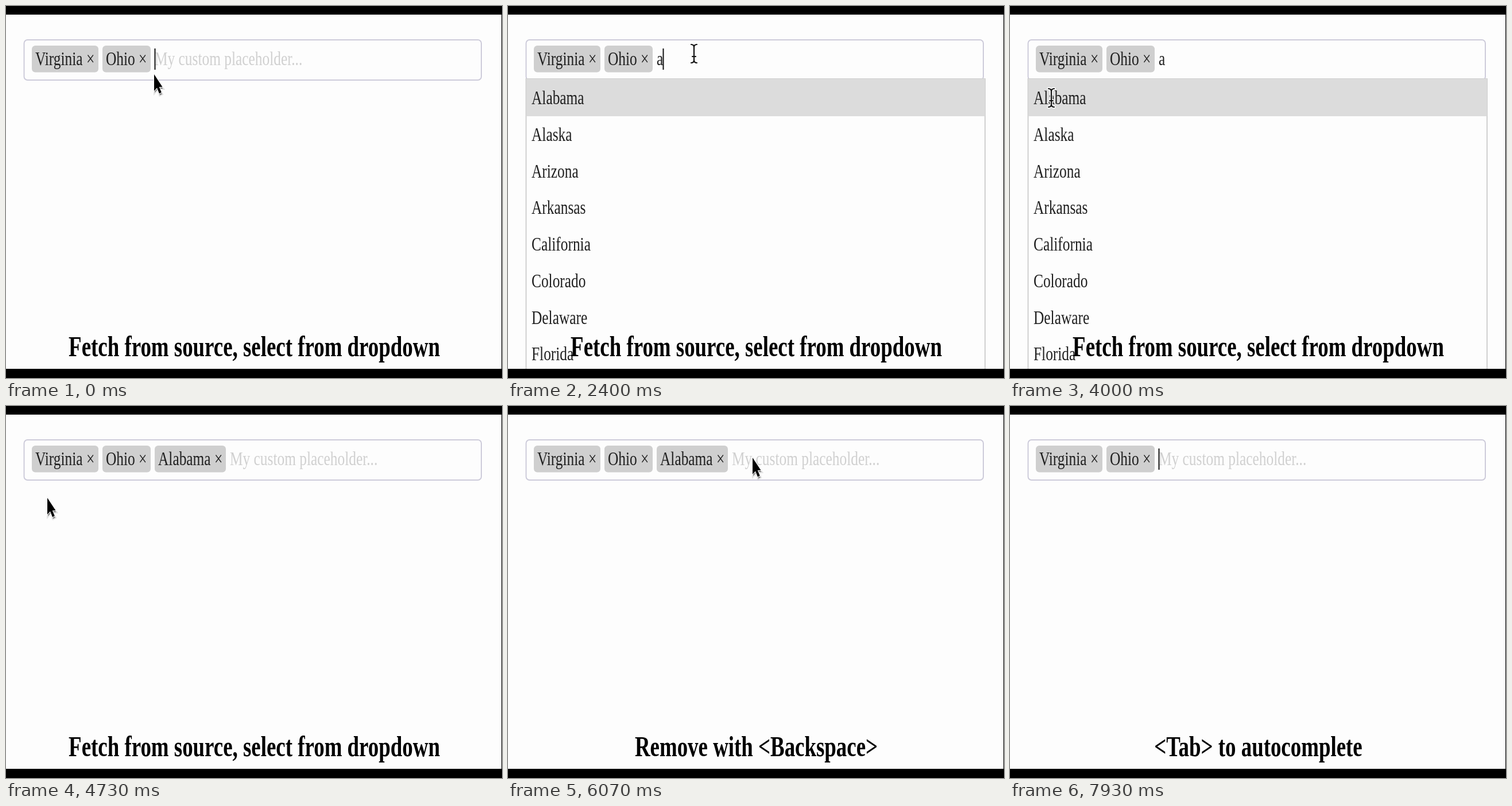
Write an HTML page that moves like this. It is 864x648 px and loops after 8 s.

```html
<!DOCTYPE html>
<html lang="en">
<head>
<meta charset="utf-8">
<title>Tag input</title>
<style>
  html, body { margin: 0; width: 100%; height: 100%; overflow: hidden; background: #000; }
  svg { display: block; width: 100vw; height: 100vh; }
  text { font-family: "Liberation Serif", "Times New Roman", serif; font-size: 25.4px; fill: #202020; white-space: pre; }
  .hint { fill: #d0d0d0; }
  .caption { font-size: 36.9px; font-weight: bold; fill: #000; text-anchor: middle; }
</style>
</head>
<body>
<svg id="stage" viewBox="0 0 864 648">
  <rect y="15" width="863" height="617" fill="#fdfdfd"/>
  <rect id="field" x="31.5" y="59" width="796.5" height="70" rx="6" fill="#fdfdfd" stroke="#cdcbda" stroke-width="2"/>
  <g id="tags"></g>
  <g id="entry"></g>
  <rect id="caret" y="74" width="2" height="37" fill="#111"/>
  <g id="list">
    <rect x="31.5" y="127" width="799.5" height="520" fill="#fdfdfd" stroke="#d0d0d0" stroke-width="2"/>
    <rect x="32" y="127" width="799" height="65" fill="#dcdcdc"/>
  </g>
  <rect y="632" width="864" height="16"/>
  <g id="caption"></g>
  <g id="arrow">
    <path d="M0 0V29L5 23.500L9 33.500L12.800 31.500L8.800 22H14.500Z" stroke="#0003" stroke-width="4" transform="translate(1 3)" opacity=".5"/>
    <path d="M0 0V29L5 23.500L9 33.500L12.800 31.500L8.800 22H14.500Z" stroke="#fff" stroke-width="2" paint-order="stroke"/>
  </g>
  <g id="beam" fill="none" stroke-linecap="round">
    <path d="M-5 -16Q0 -16 0 -11V11Q0 16 -5 16M5 -16Q0 -16 0 -11M5 16Q0 16 0 11M-3 5H3" stroke="#fff" stroke-width="5"/>
    <path d="M-5 -16Q0 -16 0 -11V11Q0 16 -5 16M5 -16Q0 -16 0 -11M5 16Q0 16 0 11M-3 5H3" stroke="#111" stroke-width="2.200"/>
  </g>
</svg>
<script>
const LOOP = 8000;
const OPEN = 2130, PICK = 4270, FOCUS = 6270, ERASE = 6730;
const TALL = 1.36; // the whole screen is stretched vertically
const $ = id => document.getElementById(id);

function add(parent, name, attrs, content = "") {
  const el = document.createElementNS("http://www.w3.org/2000/svg", name);
  for (const key in attrs) el.setAttribute(key, attrs[key]);
  el.textContent = content;
  return parent.appendChild(el);
}

const label = (parent, content, x, y, cls = "") =>
  add(parent, "text", { class: cls, transform: `translate(${x} ${y}) scale(1 ${TALL})` }, content);

function tag(name, x, width) {
  const g = add($("tags"), "g", {});
  add(g, "rect", { x, y: 69, width, height: 46.5, rx: 6, fill: "#cfcfcf" });
  label(g, name + " ×", x + 6, 103);
  return g;
}

const show = (el, on) => el.setAttribute("visibility", on ? "visible" : "hidden");
const place = (el, x, y) => el.setAttribute("transform", `translate(${x} ${y})`);

tag("Virginia", 45, 116);
tag("Ohio", 168, 84);
const picked = tag("Alabama", 259, 124);

const states = ["Alabama", "Alaska", "Arizona", "Arkansas", "California", "Colorado", "Delaware", "Florida"];
states.forEach((name, i) => label($("list"), name, 41, 171 + i * 63.75));

const hint = label($("entry"), "My custom placeholder...", 0, 103, "hint");
const typed = label($("entry"), "a", 0, 103);
const captions = [
  [0, "Fetch from source, select from dropdown"],
  [5600, "Remove with <Backspace>"],
  [7870, "<Tab> to autocomplete"]
].map(([from, content]) => ({ from, el: label($("caption"), content, 432.5, 610, "caption") }));

// time, x, y of the pointer
const route = [
  [0, 258, 119], [500, 258, 119], [1270, 302, 82], [1600, 324, 83],
  [2700, 324, 83], [3600, 72, 160], [5200, 72, 160], [6000, 426, 90], [LOOP, 426, 90]
];

function pointerAt(t) {
  const i = route.findIndex(p => p[0] > t);
  const [t0, x0, y0] = route[i - 1], [t1, x1, y1] = route[i];
  const u = (t - t0) / (t1 - t0), k = u * u * (3 - 2 * u);
  return [x0 + (x1 - x0) * k, y0 + (y1 - y0) * k];
}

const blink = since => (since + 1000) % 1000 < 500;

function caretOn(t) {
  if (t < OPEN) return blink(t + 100);
  if (t < PICK) return blink(t - OPEN);
  if (t < FOCUS) return false;
  return t < ERASE ? blink(t - FOCUS) : blink(t - ERASE);
}

function draw(t) {
  const open = t >= OPEN && t < PICK;
  const chosen = t >= PICK && t < ERASE;
  const start = chosen ? 390 : 259;
  show($("list"), open);
  show(picked, chosen);
  show(hint, !open);
  show(typed, open);
  place($("entry"), start - 259, 0);
  for (const el of [hint, typed]) el.setAttribute("x", 259);
  $("caret").setAttribute("x", open ? 269.5 : start - 0.5);
  show($("caret"), caretOn(t));

  const current = captions.findLast(c => t >= c.from);
  for (const c of captions) show(c.el, c === current);

  const [x, y] = pointerAt(t);
  const beam = t >= 1400 && t < PICK;
  place($("arrow"), x, y);
  place($("beam"), x, y);
  show($("beam"), beam);
  show($("arrow"), !beam && t < ERASE);
}

function tick(now) {
  draw(now % LOOP);
  requestAnimationFrame(tick);
}
requestAnimationFrame(tick);
</script>
</body>
</html>
```
